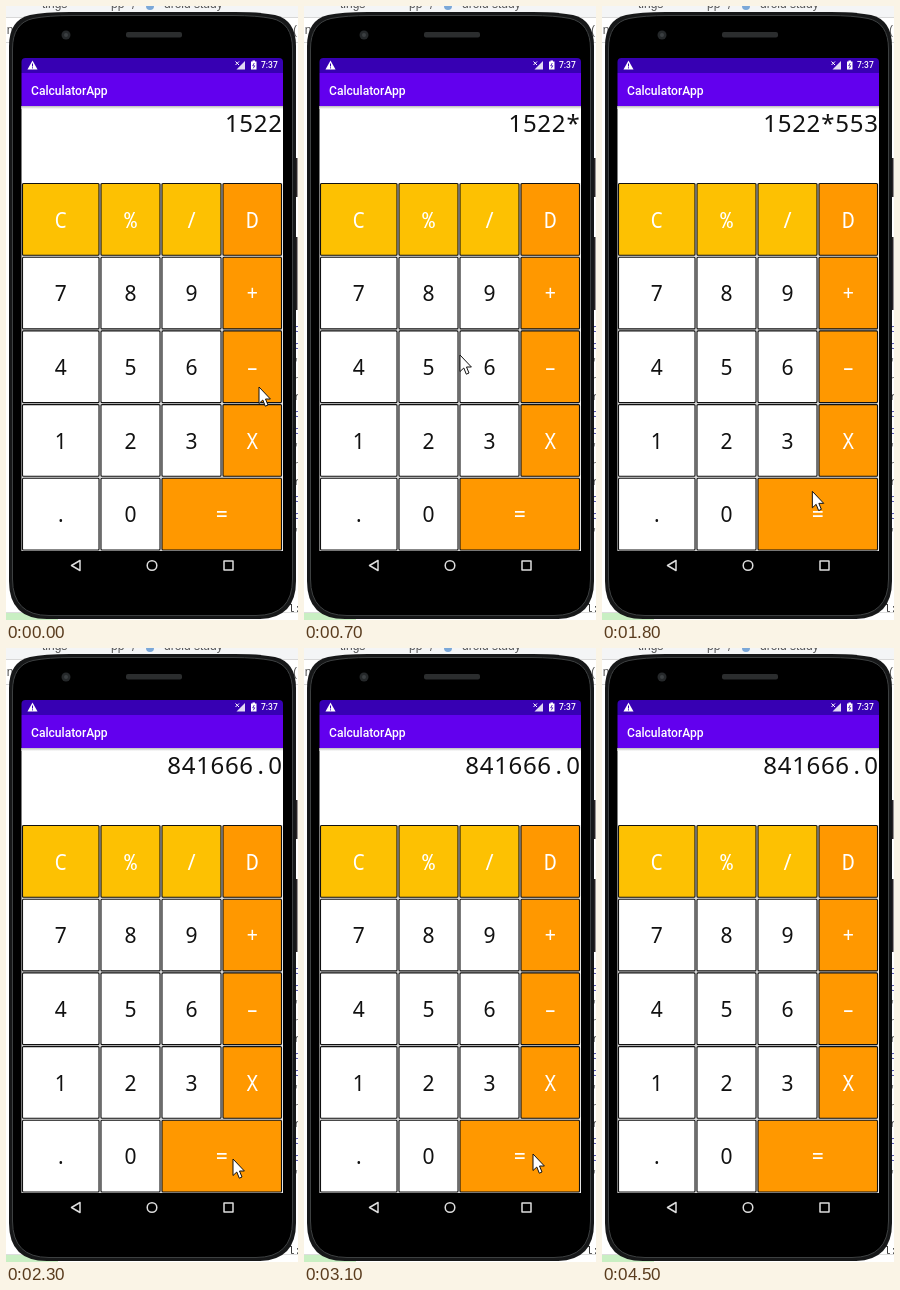
An HTML page for the animation above (4600 ms loop, 292 px wide and 614 px high).

```html
<!DOCTYPE html>
<html lang="en">
<head>
<meta charset="utf-8">
<title>Calculator</title>
<style>
html, body { margin: 0; width: 100%; height: 100%; overflow: hidden; background: #fff; }
svg { display: block; width: 292px; height: 614px; }
.key { stroke: #111; stroke-width: 1.1; }
.num, #out { font-family: "Noto Sans", "Open Sans", sans-serif; fill: #111; text-anchor: middle; }
.op { font-family: "Noto Sans Mono", "DejaVu Sans Mono", monospace; fill: #fff; text-anchor: middle; }
.dot { fill: #111; }
.num, .op { font-size: 21px; }
#out { font-size: 24px; }
.ui { font-family: Roboto, sans-serif; fill: #fff; font-weight: 500; }
.code { font: 11px "Liberation Mono", monospace; }
.web { font: 12px "Liberation Sans", sans-serif; fill: #555; }
</style>
</head>
<body>
<svg viewBox="0 0 292 614">
  <defs>
    <linearGradient id="shade" x2="0" y2="1">
      <stop offset="0" stop-color="#bbb"/>
      <stop offset="1" stop-color="#fff"/>
    </linearGradient>
  </defs>

  <!-- desktop behind the phone -->
  <rect width="292" height="614" fill="#fff"/>
  <rect width="292" height="11" fill="#f4f5f6"/>
  <path d="M0 11.5H292M0 36.5H292" stroke="#d8d8d8"/>
  <g class="web">
    <text x="36" y="2">tings</text>
    <text x="105" y="2">pp</text>
    <text x="126" y="3">/</text>
    <text x="158" y="2">droid study</text>
    <text x="-2" y="28">in</text>
    <text x="287" y="28">(</text>
  </g>
  <circle cx="144" cy="0" r="4" fill="#7aa7d8"/>
  <rect y="606" width="52" height="8" fill="#c9efc3"/>
  <path d="M0 606.5H292" stroke="#ddd"/>
  <g id="side" class="code"></g>
  <text class="code" x="282" y="606" fill="#333">l:</text>

  <!-- phone -->
  <path d="M287 152H291.5V191H287ZM287 231H291.5V304H287Z" fill="#2a2424"/>
  <path d="M3 40Q3 14 24 9Q38 6 64 6H229Q255 6 269 9Q290 14 290 40V575Q290 613 252 613H41Q3 613 3 575Z" fill="#161718"/>
  <path d="M6.5 43Q6.5 17 27 12.500Q42 9.500 66 9.500H227Q251 9.500 266 12.500Q286.500 17 286.500 43V573Q286.500 609.500 250 609.500H43Q6.500 609.500 6.500 573Z" fill="#000" stroke="#3d4041"/>
  <circle cx="60" cy="29" r="4.5" fill="#25282a"/>
  <circle cx="60" cy="29" r="2" fill="#3b3f42"/>
  <rect x="120" y="26" width="56" height="5.5" rx="2" fill="#2b2d2e"/>

  <!-- screen -->
  <rect x="15.5" y="100" width="261.5" height="445" fill="#fff"/>
  <path d="M15.5 67V56Q15.500 52 19.500 52H273Q277 52 277 56V67Z" fill="#3700b3"/>
  <rect x="15.5" y="67" width="261.5" height="33" fill="#6200ee"/>
  <rect x="15.5" y="100" width="261.5" height="3" fill="url(#shade)"/>
  <path d="M26.5 54.5L31.5 63.5H21.5Z" fill="#fff"/>
  <path d="M26.5 57.5V60.5M26.5 61.3V62.4" stroke="#3700b3"/>
  <path d="M239 55V63.5H230.5Z" fill="#fff" opacity=".85"/>
  <path d="M229.5 55.5L233 59M233 55.5L229.5 59" stroke="#fff"/>
  <path d="M246.5 54.5H249V55.5H250.5V63.5H245V55.5H246.5Z" fill="#fff"/>
  <path d="M248.3 57L246.7 59.8H248.8L247.2 62.3" fill="none" stroke="#3700b3" stroke-width=".8"/>
  <text class="ui" x="255" y="62" font-size="8.5">7:37</text>
  <text class="ui" x="25" y="88.5" font-size="12.1">CalculatorApp</text>
  <text id="out" y="126"></text>
  <rect x="16" y="177" width="260.5" height="368" fill="#ddd"/>
  <g id="keys"></g>
  <rect x="15.5" y="545" width="261.5" height="32" fill="#000"/>
  <g fill="none" stroke="#ddd" stroke-width="1.5" stroke-linejoin="round">
    <path d="M74 554.5V564.5L65.5 559.5Z"/>
    <circle cx="146" cy="559.5" r="4.8"/>
    <rect x="218" y="555" width="9" height="9"/>
  </g>

  <path id="mouse" d="M0 0V16.5L3.8 13L6.3 19.2L9 18L6.5 12H11.4Z" fill="#fff" stroke="#111" stroke-linejoin="round"/>
</svg>
<script>
const LOOP = 4600, STEP = 100;
const $ = id => document.getElementById(id);

function add(parent, tag, attrs, text = "") {
  const el = document.createElementNS("http://www.w3.org/2000/svg", tag);
  for (const k in attrs) el.setAttribute(k, attrs[k]);
  el.textContent = text;
  parent.append(el);
}

// keypad
const cols = [16.5, 95, 156, 217, 277.5];
const rows = ["C%/D", "789+", "456–", "123X", ".0="];
rows.forEach((row, r) => [...row].forEach((label, c) => {
  const x = cols[c], w = cols[label === "=" ? 4 : c + 1] - 2 - x;
  const y = 177.5 + r * 73.7;
  const plain = /[\d.]/.test(label);
  const fill = plain ? "#fff" : r === 0 && c < 3 ? "#fdc102" : "#ff9800";
  const type = label === "." ? "op dot" : plain ? "num" : "op";
  add($("keys"), "rect", { class: "key", x, y, width: w, height: 71.7, rx: 1, fill });
  add($("keys"), "text", { class: type, x: x + w / 2, y: y + 44 }, label);
}));

// code peeking out on the right
for (let y = 326, i = 0; y < 540; y += 17, i++)
  add($("side"), "text", { x: 288, y, fill: i % 5 < 2 ? "#2b2b9c" : "#444" }, "cc\"nr"[i % 5]);

// display text: [time, text]
const shown = [
  [0, "1522"], [400, "1522*"], [900, "1522*5"], [1100, "1522*55"],
  [1600, "1522*553"], [2100, "841666.0"]
];

// pointer: [time, x, y]
const path = [
  [0, 253, 381], [200, 248, 425], [300, 246, 433], [400, 244, 431],
  [700, 156, 349], [800, 134, 352], [1100, 132, 358], [1300, 169, 426],
  [1400, 183, 435], [1600, 185, 438], [1900, 223, 509], [2300, 227, 511],
  [3100, 229, 506], [3300, 232, 508], [3700, 300, 540], [4600, 300, 540]
];

function pointer(t) {
  const i = path.findIndex(p => p[0] > t);
  const [t0, x0, y0] = path[i - 1], [t1, x1, y1] = path[i];
  const k = (t - t0) / (t1 - t0);
  return [x0 + (x1 - x0) * k, y0 + (y1 - y0) * k];
}

// right-aligned, evenly spaced characters
function show(text) {
  const out = $("out");
  if (out.textContent === text) return;
  const n = text.length;
  out.setAttribute("x", [...text].map((_, i) => 269 - (n - 1 - i) * 14.4).join(" "));
  out.textContent = text;
}

const start = performance.now();
function draw(now) {
  const t = Math.floor(Math.max(0, now - start) % LOOP / STEP) * STEP;
  show(shown.filter(s => s[0] <= t).pop()[1]);
  $("mouse").setAttribute("transform", `translate(${pointer(t)})`);
  requestAnimationFrame(draw);
}
draw(start);
</script>
</body>
</html>
```
